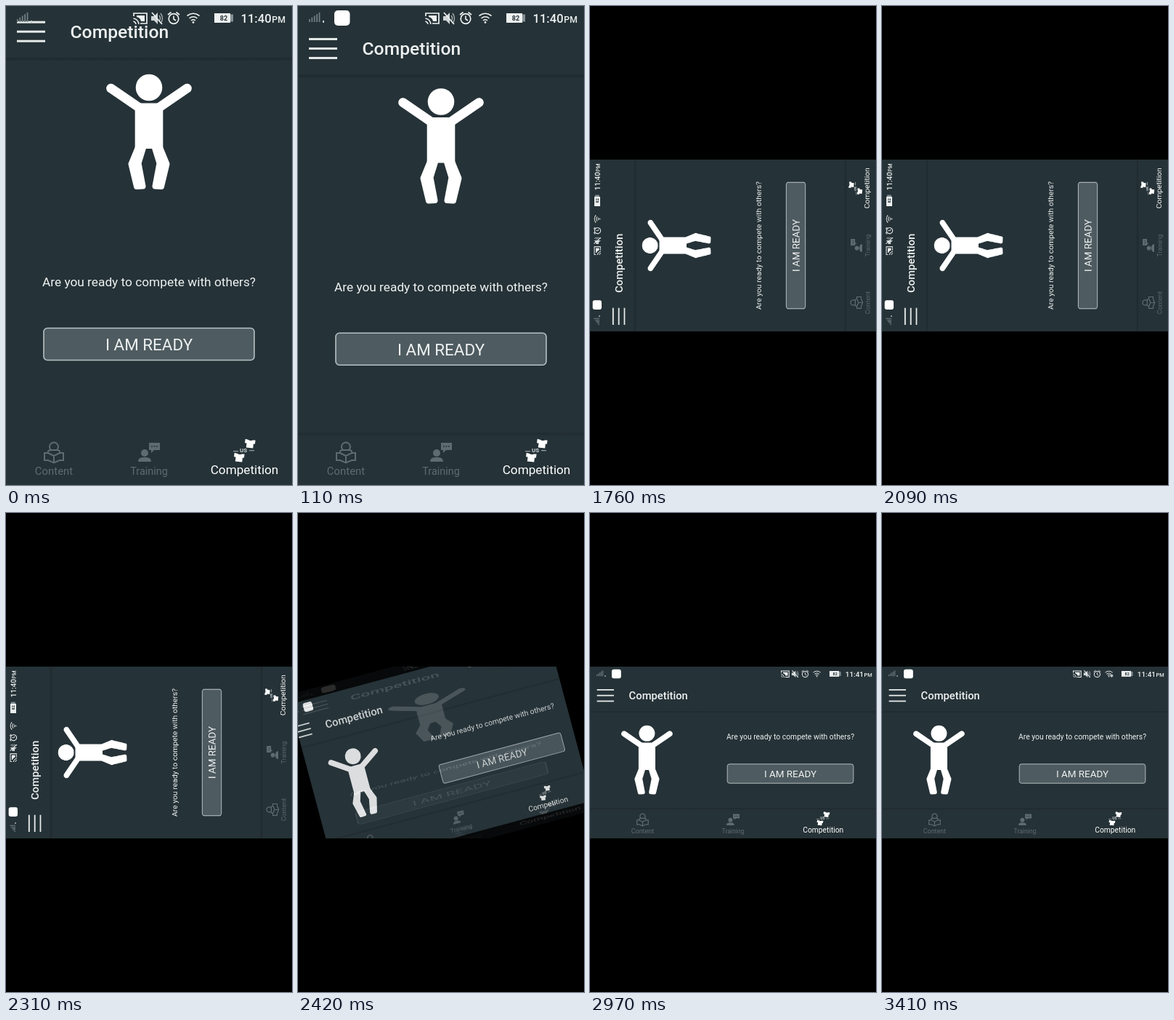
An HTML page with a canvas that plays this animation: 394x658 px, repeating every 3740 ms.

```html
<!DOCTYPE html>
<html lang="en">
<head>
<meta charset="utf-8">
<title>Competition screen</title>
<style>
html, body { margin: 0; width: 100%; height: 100%; overflow: hidden; background: #000; }
canvas { display: block; }
</style>
</head>
<body>
<canvas id="stage" width="394" height="658"></canvas>
<script>
const W = 394, H = 658, FIT = W / H, LOOP = 3740, STEP = 110;
const BG = '#253237', WHITE = '#fff', SOFT = '#eef1f1', DIM = '#5f6b6f';
const stage = document.getElementById('stage').getContext('2d');
const layer = stage.canvas.cloneNode().getContext('2d');
let ctx = stage;

const lerp = (a, b, p) => a + (b - a) * p;
const clamp = v => Math.max(0, Math.min(1, v));

function text(str, x, y, size, { weight = 400, align = 'center', color = SOFT } = {}) {
  ctx.font = `${weight} ${size}px Roboto, sans-serif`;
  ctx.textAlign = align;
  ctx.fillStyle = color;
  ctx.fillText(str, x, y);
}

function rect(x, y, w, h, color) {
  ctx.fillStyle = color;
  ctx.fillRect(x, y, w, h);
}

function fill(d, color) {
  ctx.fillStyle = color;
  ctx.fill(new Path2D(d));
}

function stroke(d, color, width) {
  ctx.strokeStyle = color;
  ctx.lineWidth = width;
  ctx.stroke(new Path2D(d));
}

function disc(x, y, r, color) {
  ctx.beginPath();
  ctx.arc(x, y, r, 0, 7);
  ctx.fillStyle = color;
  ctx.fill();
}

function roundRect(x, y, w, h, r, color, border) {
  ctx.beginPath();
  ctx.roundRect(x, y, w, h, r);
  ctx.fillStyle = color;
  ctx.fill();
  if (border) {
    ctx.strokeStyle = border;
    ctx.lineWidth = 1.6;
    ctx.stroke();
  }
}

function at(x, y, draw) {
  ctx.save();
  ctx.translate(x, y);
  draw();
  ctx.restore();
}

function shadow(y, w, strength) {
  const g = ctx.createLinearGradient(0, y - 2, 0, y + 4);
  g.addColorStop(0, 'rgba(0,0,0,0)');
  g.addColorStop(.4, `rgba(0,0,0,${strength})`);
  g.addColorStop(1, 'rgba(0,0,0,0)');
  rect(0, y - 2, w, 6, g);
}

function statusBar(w, { notice, lit, minute, arrow }) {
  for (let i = 0; i < 5; i++) {
    const h = 4 + i * 2.3;
    rect(15 + i * 3.4, 22 - h, 1.8, h, i < lit ? '#d5dbdc' : '#6f7c81');
  }
  rect(34, 20, 2, 3, '#c5cccd');
  if (notice) roundRect(50, 6, 21.5, 21, 5, WHITE);

  at(w - W, 0, () => {
    // cast
    stroke('M176 14V10H194V24H185', SOFT, 1.7);
    fill('M180 13H191V21H186Q185 16 180 15Z', SOFT);
    stroke('M175.5 17Q182 18 183 25M175.5 21Q178.5 22 179 25', SOFT, 1.5);
    // muted speaker
    fill('M200 14H204L209 9V25L204 20H200Z', '#cfd5d6');
    stroke('M211 13Q214 17 211 21M213 10Q218 17 213 24', '#aab3b5', 1.3);
    stroke('M201 9L215 25', SOFT, 1.7);
    // alarm
    ctx.beginPath();
    ctx.arc(231, 17.5, 6.8, 0, 7);
    ctx.strokeStyle = SOFT;
    ctx.lineWidth = 1.7;
    ctx.stroke();
    stroke('M231 13.5V18L234 20M223 12L227.5 8.5M239 12L234.5 8.5', SOFT, 1.6);
    // wifi
    stroke('M249.5 13.5Q258 7 266.5 13.5M252.5 17Q258 12.5 263.5 17M255 20Q258 17.5 261 20', SOFT, 1.6);
    disc(258, 22.5, 1.4, SOFT);
    if (arrow) fill('M261.5 18H267V21H269L264.3 25L260 21H261.5Z', '#b9c2c4');
    // battery
    rect(287, 10, 22, 13, SOFT);
    rect(309, 11.5, 4, 10, '#849095');
    text('82', 300, 20, 9, { weight: 700, color: BG });

    text('11:4' + minute, 323.5, 23, 16.6, { weight: 500, align: 'left' });
    text('PM', 385, 23, 12.3, { weight: 500, align: 'right' });
  });
}

function header(y, w, shift = 0) {
  shadow(y + 36, w, .16);
  for (const dy of [-13, 0, 13]) rect(15 + shift, y + dy - 2.3, 39, 3, '#e6eaea');
  text('Competition', 88.5 + shift, y + 8, 24.7, { weight: 500, align: 'left' });
}

// Origin: centre of the head
function figure(x, y) {
  at(x, y, () => {
    disc(0, 0, 18.3, WHITE);
    ctx.lineCap = ctx.lineJoin = 'round';
    stroke('M-52.5 1L-13 28M52.5 1L13 28', WHITE, 12.7);
    fill('M-15 21.5H15L19.3 30V84H-19.3V30Z', WHITE);
    for (const side of [1, -1]) {
      ctx.save();
      ctx.scale(side, 1);
      const leg = 'M-15 82L-24.500 105L-17 136L-8.500 135.500L-14.500 104L-8 83Z';
      fill(leg, WHITE);
      stroke(leg, WHITE, 8);
      ctx.restore();
    }
  });
}

// Centred on the button
function prompt(x, y) {
  text('Are you ready to compete with others?', x, y - 79.3, 17.3);
  roundRect(x - 145, y - 22, 290, 44, 5, '#4e5b60', '#b8c1c3');
  text('I AM READY', x, y + 8.7, 22.4);
}

function shirt(x, y) {
  at(x, y, () => {
    ctx.rotate(.12);
    fill('M-7 -5.5L-3 -5Q0 -3 3 -5L7 -5.5V0L5 0V6H-4.5V0L-7 0Z', WHITE);
  });
}

// y is the centre line of the icons
function tabs(y, w, xs, edge = 1) {
  shadow(y - 26, w, .16 * edge);
  at(xs[0], y, () => {
    stroke('M-4 -3A6 6 0 1 1 4 -3', DIM, 2);
    stroke('M0 5L-8 1H-13V11H-8L0 14.5L8 11H13V1H8ZV14.500M-8 1Q-9 -3 -4 -3H4Q9 -3 8 1', DIM, 2);
  });
  at(xs[1], y, () => {
    disc(-6, 1, 5, DIM);
    fill('M-15 13Q-15 6 -6 7Q3 6 3 13Z', DIM);
    fill('M0 -13H15V-3H7L3 1V-3H0Z', DIM);
    for (const x of [4, 7.5, 11]) disc(x, -8, 1, BG);
  });
  at(xs[2], y, () => {
    shirt(8, -12);
    shirt(-7, 7);
    text('US', -1, 0, 8, { weight: 700, color: '#cfd5d6' });
    rect(-15, -2, 7, 1.2, '#9aa4a7');
    rect(7, -3, 7, 1.2, '#9aa4a7');
  });
  text('Content', xs[0], y + 31, 14.9, { color: DIM });
  text('Training', xs[1], y + 31, 14.4, { color: DIM });
  text('Competition', xs[2] + .5, y + 30, 17.2, { color: WHITE });
}

function portrait(settle) {
  rect(0, 0, W, H, BG);
  header(lerp(36, 67, settle), W);
  statusBar(W, { notice: settle > 0, lit: 0, minute: 0 });
  figure(197, lerp(112, 138, settle));
  prompt(197, lerp(464.5, 473.5, settle));
  tabs(613, W, [66, 197, 328], settle);
}

function landscape(t) {
  const late = t >= 2970;
  rect(0, 0, H, W, BG);
  header(67, H, t >= 2640 ? 1 : 0);
  statusBar(H, { notice: true, lit: late ? 0 : 2, minute: late ? 1 : 0, arrow: t >= 3410 });
  figure(131, 153);
  prompt(461, 245.5);
  tabs(351, H, [121, 329, 536]);
}

// The old screen stretches and fades while both screens turn upright
function turning(t) {
  const p = clamp((t - 2310) / 132);
  const w = lerp(W * FIT, W, p), h = lerp(W, W * FIT, p);
  ctx.beginPath();
  ctx.rect(0, (H - W * FIT) / 2, W, W * FIT);
  ctx.clip();
  ctx.translate(W / 2, H / 2);
  ctx.rotate((p - 1) * Math.PI / 2);
  ctx.beginPath();
  ctx.rect(-w / 2, -h / 2, w, h);
  ctx.clip();
  if (p > 0) at(0, 0, () => {
    ctx.scale(FIT, FIT);
    ctx.translate(-H / 2, -W / 2);
    landscape(t);
  });
  if (p < 1) {
    // flattened first, so that overlapping shapes fade as one
    ctx = layer;
    at(0, 0, () => portrait(1));
    ctx = stage;
    ctx.globalAlpha = 1 - p;
    ctx.drawImage(layer.canvas, -w / 2, -h / 2, w, h);
  }
}

function frame() {
  const t = Math.floor(performance.now() % LOOP / STEP) * STEP;
  ctx.save();
  rect(0, 0, W, H, '#000');
  if (t < 1760) portrait(1 - (1 - clamp(t / 220)) ** 2);
  else turning(t);
  ctx.restore();
  requestAnimationFrame(frame);
}
frame();
</script>
</body>
</html>
```
